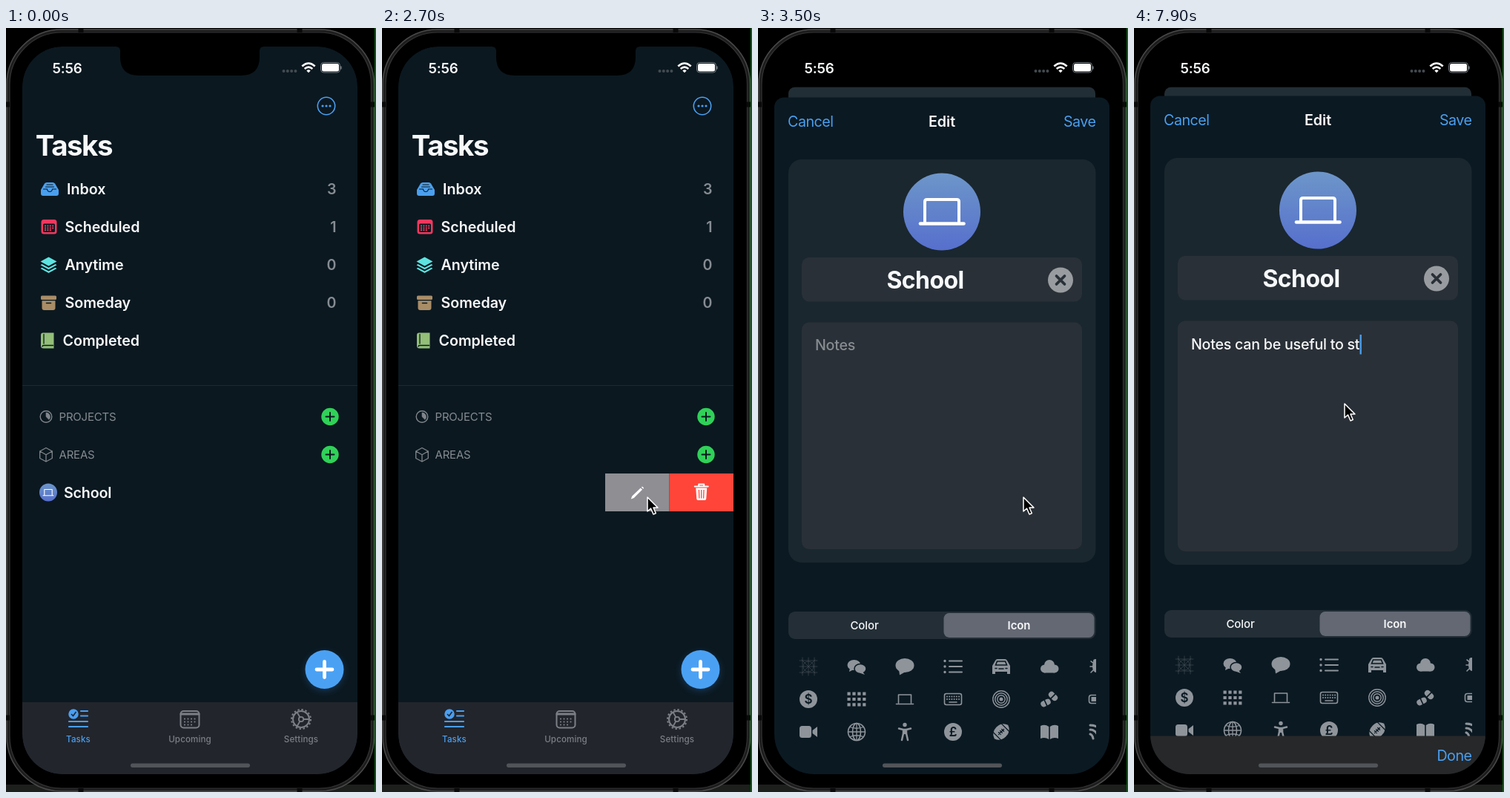
An HTML page for the animation above (8000 ms loop, 499x1029 px).

```html
<!DOCTYPE html>
<html lang="en">
<head>
<meta charset="utf-8">
<title>Task list</title>
<style>
html, body { margin: 0; width: 100%; height: 100%; overflow: hidden; background: #000; }
svg { display: block; width: 100%; height: 100%; }
text { font: 600 19.7px Inter, Roboto, sans-serif; font-optical-sizing: none; letter-spacing: -.05px; fill: #f6f8f9; white-space: pre; }
.link { font-weight: 400; letter-spacing: -.5px; fill: #4a9ff0; }
.end { text-anchor: end; }
.mid { text-anchor: middle; }
.count { fill: #868c92; text-anchor: end; }
.section { font-size: 15px; font-weight: 400; letter-spacing: -.2px; fill: #858b90; }
.tab { font-size: 11.6px; font-weight: 500; letter-spacing: .1px; fill: #7c7f85; text-anchor: middle; }
.seg { font-size: 15px; font-weight: 500; letter-spacing: -.1px; text-anchor: middle; }
.note { font-weight: 500; letter-spacing: -.27px; }
.o { fill: none; stroke: #8e949a; stroke-width: 1.6; stroke-linecap: round; stroke-linejoin: round; }
.cut { fill: none; stroke: #0b1820; stroke-width: 1.6; stroke-linecap: round; }
.w { fill: none; stroke: #fff; stroke-linecap: round; stroke-linejoin: round; }
#icons { fill: #8e949a; }
#icons text { font-size: 17px; font-weight: 600; fill: #0b1922; text-anchor: middle; }
#icons .cut { stroke: #0b1922; }
</style>
</head>
<body>
<svg viewBox="0 0 499 1029" preserveAspectRatio="none">
<defs>
  <linearGradient id="blue" x2="0" y2="1"><stop stop-color="#6d96c9"/><stop offset="1" stop-color="#566fcd"/></linearGradient>
  <clipPath id="screen"><rect x="22" y="25" width="452" height="980" rx="54"/></clipPath>
  <clipPath id="homeClip"><rect id="homeShape" x="22" y="25" width="452" height="980" rx="54"/></clipPath>
  <clipPath id="iconClip"><rect x="41" y="830" width="415" height="180"/></clipPath>
  <filter id="glow" x="-50%" y="-50%" width="200%" height="200%"><feGaussianBlur stdDeviation="5"/></filter>
</defs>

<!-- phone body -->
<rect width="499" height="1029"/>
<rect y="1019" width="499" height="10" fill="#1c1f1c"/>
<rect x="1" y="2" width="495.5" height="1026" rx="74" fill="#1d1d1e" stroke="#4b4b4c" stroke-width="1.5"/>
<rect x="5" y="6" width="487.5" height="1018" rx="70" stroke="#333334" stroke-width="1.2"/>
<path d="M0 103H5M492 103H497M0 929H5M492 929H497M101 1V6M396 1V6M101 1024V1029M396 1024V1029" stroke="#0a0a0a" stroke-width="7"/>
<path d="M498 0V1029" stroke="#06600c" stroke-width="2"/>

<g clip-path="url(#screen)">
  <g id="home"><g clip-path="url(#homeClip)">
    <rect id="homeBg" x="22" y="25" width="452" height="980"/>
    <g id="menu" fill="#4a9ff0" stroke="#4a9ff0">
      <circle cx="432" cy="105" r="11.7" fill="none" stroke-width="1.6"/>
      <path d="M427 105h.01M432 105h.01M437 105h.01" stroke-width="3.2" stroke-linecap="round"/>
    </g>
    <text x="39.8" y="172.3" style="font-size:38.5px;font-weight:700;letter-spacing:-1.5px">Tasks</text>
    <g id="lists"></g>

    <path d="M47 218L52 209.5Q53 208 55 208H63Q65 208 66 209.5L71 218V223Q71 226 68 226H50Q47 226 47 223Z" fill="#4a9fee"/>
    <path class="cut" d="M50.5 217H55.5Q56 220.5 59 220.5Q62 220.5 62.5 217H67.5M55 211H63M53.5 214H64.5" style="stroke-width:1.1"/>

    <rect x="47.5" y="258" width="21" height="19.5" rx="3.5" fill="#f0385f"/>
    <rect x="50" y="263.5" width="16" height="11.5" rx="1.5" fill="#0b1820"/>
    <path d="M52 266.5H65M52 269.4H65M52 272.3H62" stroke="#f0385f" stroke-width="2" stroke-dasharray="2 1.4"/>

    <g fill="#5fe3e0"><path d="M57.5 308.5L68.5 314.5L57.5 320.5L46.5 314.5Z"/>
      <path d="M48.5 318L57.5 322.8L66.5 318L68.5 319.2L57.5 325.2L46.5 319.2Z"/>
      <path d="M48.5 322.8L57.5 327.6L66.5 322.8L68.5 324L57.5 330L46.5 324Z"/></g>

    <g fill="#a98d67"><rect x="47" y="360.5" width="21" height="5.5" rx="1.5"/>
      <path d="M48.5 367.3H66.5V377Q66.5 380 63.5 380H51.5Q48.5 380 48.5 377Z"/></g>
    <path class="cut" d="M54.5 370.5H60.5"/>

    <path d="M50 410.5H64.5V431.5H50.5Q47 431.5 47 428V413.5Q47 410.5 50 410.5Z" fill="#93bf78"/>
    <path class="cut" d="M51 412.5V425M63.5 427.5H51Q49 427.5 49 429" style="stroke-width:1.3"/>

    <path d="M22 481.5H474" stroke="#1c2931"/>
    <circle cx="54" cy="523.5" r="7.8" class="o" style="stroke:#80868b;stroke-width:1.4"/>
    <path d="M54 518V523.5L58 527.4A5.6 5.6 0 0 0 54 518Z" fill="#80868b" stroke="#80868b" stroke-width=".6"/>
    <path d="M54 565.5L62.3 570V579.5L54 584L45.7 579.5V570ZM45.7 570L54 574.7L62.3 570M54 574.7V584" class="o" style="stroke:#80868b;stroke-width:1.3"/>
    <text x="71.5" y="529" class="section">PROJECTS</text>
    <text x="71.5" y="580" class="section">AREAS</text>
    <g id="adds"></g>

    <g id="row">
      <circle cx="57" cy="625.5" r="12" fill="url(#blue)"/>
      <path class="w" d="M51.8 629V621.5H62.2V629M50 629.7H64" stroke-width="1.1"/>
      <text x="78" y="632.7" style="letter-spacing:-.2px">School</text>
    </g>
    <rect id="editBtn" y="600" height="51" fill="#8e8e93"/>
    <rect id="trashBtn" y="600" height="51" fill="#ff453a"/>
    <path id="pencil" d="M-8.5 8.5L-7 4.5L4.5 -6.5L6.8 -4.2L-4.5 7ZM5.6 -7.6L6.8 -8.6L8.9 -6.5L7.9 -5.3Z" fill="#fff"/>
    <g id="trash"><path class="w" d="M-9 -7.5H9M-3.5 -8V-10.5H3.5V-8" stroke-width="2"/>
      <path d="M-7.5 -5.5H7.5L6.5 9Q6.4 11 4.5 11H-4.5Q-6.4 11 -6.5 9Z" fill="#fff"/>
      <path d="M-3.3 -3L-2.9 8.5M0 -3V8.5M3.3 -3L2.9 8.5" stroke="#ff453a" stroke-width="1.3"/></g>

    <circle cx="429.5" cy="867" r="26" fill="#2f6ca8" opacity=".35" filter="url(#glow)"/>
    <circle cx="429.5" cy="864" r="26" fill="#4aa1f4"/>
    <path class="w" d="M419 864H440M429.5 853.5V874.5" stroke-width="4.8"/>

    <rect x="22" y="908" width="452" height="97" fill="#22252c"/>
    <g stroke="#4a9ff0" stroke-width="2.2" stroke-linecap="round"><circle cx="91" cy="924" r="6" fill="#4a9ff0" stroke-width="1.5"/>
      <path d="M101 920H110M101 926.5H110M85 934H110M85 941H110"/></g>
    <path d="M88 924L90.5 926.5L94.5 921" fill="none" stroke="#22252c" stroke-width="1.6"/>
    <g class="o" style="stroke:#7c7f85;stroke-width:2"><rect x="235.5" y="920" width="25" height="22.5" rx="4"/><path d="M236 924H260" stroke-width="3"/>
      <path d="M241 930.5H257M241 934.5H257M241 938.5H253" stroke-dasharray=".01 4.5" stroke-width="2.2"/></g>
    <g fill="none" stroke="#7c7f85" stroke-width="2"><circle cx="398" cy="931" r="11"/>
      <circle cx="398" cy="931" r="13" stroke-dasharray="2.4 2.705"/>
      <circle cx="398" cy="931" r="3.2" stroke-width="1.8"/><path d="M401.2 931H409M396.4 928.2L392.5 921.5M396.4 933.8L392.5 940.5" stroke-width="1.8"/></g>
    <text x="97.5" y="961.5" class="tab" style="fill:#4a9ff0">Tasks</text>
    <text x="248" y="961.5" class="tab">Upcoming</text>
    <text x="398" y="961.5" class="tab">Settings</text>
    <rect id="dim" x="22" y="25" width="452" height="980"/>
  </g></g>

  <g id="sheet">
    <rect x="22" y="91.5" width="452" height="1000" rx="13" fill="#0b1922"/>
    <text x="40" y="131" class="link">Cancel</text>
    <text x="248" y="131" class="mid">Edit</text>
    <text x="455.5" y="131" class="link end">Save</text>
    <rect id="card" x="41" y="175" width="414.5" rx="18" fill="#1a272e"/>
    <circle cx="248" cy="245.5" r="52" fill="url(#blue)"/>
    <path class="w" d="M225 259V232Q225 229 228 229H268Q271 229 271 232V259" stroke-width="4"/>
    <path class="w" d="M219 261.5H277.5" stroke-width="4.6"/>
    <rect x="59" y="307" width="378" height="59.5" rx="10" fill="#293037"/>
    <text x="225.5" y="349" class="mid" style="font-size:32px;font-weight:700;letter-spacing:-.6px">School</text>
    <circle cx="408" cy="337.5" r="17" fill="#989ca0"/>
    <path d="M402.5 332L413.5 343M413.5 332L402.5 343" stroke="#293037" stroke-width="3.8" stroke-linecap="round"/>
    <rect id="notesBox" x="59" y="394.5" width="378" rx="10" fill="#2a3037"/>
    <text id="note" x="77" y="432.5" class="note"></text>
    <rect id="caret" y="413" width="2.3" height="26.5" fill="#4a9ff0"/>
    <rect x="41" y="784" width="414.5" height="37" rx="9" fill="#232e36"/>
    <rect x="250.5" y="786" width="203" height="33" rx="7.5" fill="#636873"/>
    <text x="143.5" y="808" class="seg">Color</text>
    <text x="352" y="808" class="seg" style="font-weight:600">Icon</text>
    <g id="icons" clip-path="url(#iconClip)"></g>
  </g>

  <g id="toolbar">
    <rect x="22" y="953.5" width="452" height="60" fill="#272829"/>
    <text x="455.5" y="987" class="link end">Done</text>
  </g>
  <rect x="168" y="990.5" width="161" height="5.5" rx="2.75" fill="#515459"/>
  <path d="M148 24V25Q154 25 154 31V39Q154 64 179 64H317Q342 64 342 39V31Q342 25 348 25V24Z"/>
  <text x="82.5" y="60.5" class="mid" style="font-size:18.8px;letter-spacing:-.2px">5:56</text>
  <path d="M374.5 58H392" stroke="#434b51" stroke-width="4" stroke-linecap="round" stroke-dasharray=".01 5.3"/>
  <g class="w" stroke-width="2.6" style="stroke-linecap:butt"><path d="M399.3 51.5Q408 43.5 416.7 51.5M402.7 55Q408 50.2 413.3 55"/><path d="M405.3 57.5Q408 55.2 410.7 57.5L408 60.2Z" fill="#fff" stroke="none"/></g>
  <rect x="424.5" y="46.5" width="26" height="13.5" rx="4" fill="none" stroke="#747b80"/>
  <rect x="426" y="48" width="23" height="10.5" rx="2.5" fill="#fff"/>
  <path d="M452 51.5V55.5" stroke="#747b80" stroke-width="1.5"/>
</g>
<path id="cursor" d="M0 0V19L4.5 15L8 23L11.3 21.5L8 14H14Z" stroke="#fff" stroke-width="1.5" stroke-linejoin="round"/>
</svg>

<script>
const $ = id => document.getElementById(id);
const set = (id, attrs) => { for (const k in attrs) $(id).setAttribute(k, attrs[k]); };
const clamp = v => Math.min(1, Math.max(0, v));
const lerp = (a, b, k) => a + (b - a) * k;
const smooth = k => k * k * (3 - 2 * k);
const span = (t, a, b) => clamp((t - a) / (b - a));

// remaining distance of a critically damped spring, 1 → 0
const spring = (t, start) => {
  const x = Math.max(0, t - start) * 0.018;
  return (1 + x) * Math.exp(-x);
};

const lists = [['Inbox', 82, 3], ['Scheduled', 79.5, 1], ['Anytime', 79.5, 0], ['Someday', 79.5, 0], ['Completed', 76.5, '']];
$('lists').innerHTML = lists.map(([name, x, n], i) => {
  const y = 224 + i * 51.1;
  return `<text x="${x}" y="${y}">${name}</text><text x="445.5" y="${y}" class="count">${n}</text>`;
}).join('');

$('adds').innerHTML = [523.5, 574.5].map(y =>
  `<circle cx="437" cy="${y}" r="11.7" fill="#30d158"/>
   <path class="cut" d="M431.5 ${y}h11M437 ${y - 5.5}v11" style="stroke-width:2"/>`).join('');

const coin = sign => `<circle r="12"/><text y="6">${sign}</text>`;
const dots = (rows, style) => `<path class="o" d="${rows.map(y => `M-12.5 ${y}H12.5`).join('')}" style="${style}"/>`;
const glyphs = [
  `<g opacity=".4"><path class="o" d="M-12 -8H12M-12 0H12M-12 8H12M-8 -12V12M0 -12V12M8 -12V12M-9 -9L9 9M9 -9L-9 9" style="stroke-width:.7"/><circle class="o" r="7" style="stroke-width:.7"/></g>`,
  `<ellipse cx="-3.5" cy="-2" rx="9" ry="7"/><path d="M-9 2L-10 7L-4 4Z"/><ellipse cx="5" cy="3" rx="8" ry="6.5" stroke="#0b1922" stroke-width="1.5"/><path d="M8 7L11 11L4 8.5Z"/>`,
  `<ellipse cy="-1.5" rx="12.5" ry="9.5"/><path d="M-8 4L-7 11.5L1 7Z"/>`,
  `<path class="o" d="M-5 -7.5H12M-5 0H12M-5 7.5H12" style="stroke-width:2"/><path class="o" d="M-11 -7.5h.01M-11 0h.01M-11 7.5h.01" style="stroke-width:3.4"/>`,
  `<path d="M-12 -1L-8 -8Q-7 -10 -5 -10H5Q7 -10 8 -8L12 -1V10H8V7H-8V10H-12Z"/><path class="cut" d="M-7.5 -2L-5.5 -7H5.5L7.5 -2Z"/><path class="cut" d="M-8 2.5h2M6 2.5h2M-3 3H3"/>`,
  `<circle cx="-6.5" cy="3" r="5.5"/><circle cx="0" cy="-2" r="7"/><circle cx="7" cy="3" r="5.5"/><rect x="-7" y="0" width="14" height="8.5"/>`,
  `<ellipse cx="-2" rx="5" ry="8"/><circle cx="-3" cy="-7" r="3"/><path class="o" d="M-5 -4L-9 -7M-5 0H-10M-5 4L-9 8"/>`,
  coin('$'),
  dots([-7.4, 0, 7.4], 'stroke-linecap:butt;stroke-width:4.2;stroke-dasharray:4.2 2.7'),
  `<path class="o" d="M-8.5 5V-6H8.5V5M-11.5 6.5H11.5"/>`,
  `<rect class="o" x="-11.5" y="-7.5" width="23" height="15" rx="2.5"/><path class="o" d="M-8 -3.5H8.5M-8 0H8.5" style="stroke-width:2;stroke-dasharray:.01 3.2"/><path class="o" d="M-5 4H5"/>`,
  [11.2, 8.2, 5.2].map(r => `<circle class="o" r="${r}" style="stroke-width:1.4"/>`).join('') + '<circle r="2.5"/>',
  `<g transform="translate(-5 5) rotate(-25)"><rect x="-7" y="-4" width="14" height="8" rx="4"/><path class="cut" d="M0 -4V4"/></g><g transform="translate(5 -4) rotate(45)"><rect x="-7" y="-4" width="14" height="8" rx="4"/><path class="cut" d="M0 -4V4"/></g>`,
  `<rect class="o" x="-11.5" y="-5.5" width="22" height="11" rx="3"/><rect x="-8.5" y="-3" width="14" height="6"/>`,
  `<rect x="-12" y="-8" width="16" height="16" rx="3.5"/><path d="M5.5 -2L12 -7V7L5.5 2Z"/>`,
  `<circle class="o" r="11.5"/><ellipse class="o" rx="5.5" ry="11.5"/><path class="o" d="M0 -11V11M-11 0H11M-9 -6.5Q0 -3 9 -6.5M-9 6.5Q0 3 9 6.5" style="stroke-width:1.3"/>`,
  `<circle cy="-9.5" r="2.7"/><path class="o" d="M-8 -4.5L-2 -3V2L-4 11M8 -4.5L2 -3V2L4 11M-2 -3H2M0 -3V2" style="stroke-width:2.5"/>`,
  coin('£'),
  `<g transform="rotate(-45)"><path d="M-13 0Q-10 -9 0 -9Q10 -9 13 0Q10 9 0 9Q-10 9 -13 0Z"/><path class="cut" d="M-5 0H5M-3 -2V2M0 -2V2M3 -2V2M-8 -7V7M8 -7V7" style="stroke-width:1.3"/></g>`,
  `<path d="M-.8 -7Q-6 -11 -12 -8V9Q-6 6.5 -.8 10ZM.8 -7Q6 -11 12 -8V9Q6 6.5 .8 10Z"/>`,
  `<path class="o" d="M-10 -9Q0 -9 6 -1M-10 -3Q-4 -3 0 4M-10 3Q-7 4 -6 9" style="stroke-width:3"/>`
];
$('icons').innerHTML = glyphs.map((g, i) =>
  `<g transform="translate(${68 + i % 7 * 65} ${858 + Math.floor(i / 7) * 44})">${g}</g>`).join('');

// typing: tenths of a second at which each letter lands
const phrase = 'Notes can be useful to st';
const keys = [45, 47, 48, 49, 51, 53, 54, 56, 57, 58, 59, 61, 62, 64, 64, 66, 68, 69, 71, 72, 74, 75, 76, 77, 79];

// time, x, y of the pointer tip
const path = [[0, 500, 1030], [900, 330, 632], [1100, 330, 632], [1700, 78, 626], [2100, 78, 626],
  [2700, 358, 632], [3800, 358, 632], [4100, 284, 506], [8000, 284, 506]];

function pointer(t) {
  const i = path.findIndex((p, n) => n && t <= p[0]);
  const [a, b] = [path[i - 1], path[i]];
  const k = smooth(span(t, a[0], b[0]));
  return [lerp(a[1], b[1], k), lerp(a[2], b[2], k)];
}

function drawSwipe(t, tipX) {
  const pull = clamp((330 - tipX) / 200);
  const open = t < 2100 ? 173 * pull : 173 * spring(t, 2937);
  const half = open / 2;
  set('row', { transform: `translate(${-open} 0)` });
  set('editBtn', { x: 474 - open, width: half });
  set('trashBtn', { x: 474 - half, width: half });
  const opacity = clamp((half - 24) / 24);
  set('pencil', { transform: `translate(${474 - half * 1.5} 626)`, opacity });
  set('trash', { transform: `translate(${474 - half / 2} 625)`, opacity });
}

function drawSheet(t) {
  const left = spring(t, 3035), p = 1 - left;
  set('home', { transform: `translate(248 ${25 + 54.5 * p}) scale(${1 - 0.084 * p}) translate(-248 -25)` });
  set('homeShape', { rx: 10 + 44 * left ** 3 });
  set('homeBg', { fill: `rgb(${lerp(11, 40, p)},${lerp(24, 53, p)},${lerp(32, 62, p)})` });
  set('dim', { opacity: 0.14 * p + 0.1 * Math.min(p, left) });
  const tint = p > 0 ? '#596268' : '#4a9ff0';
  set('menu', { fill: tint, stroke: tint });
  set('sheet', { transform: `translate(0 ${914 * left})` });
}

function drawNote(t) {
  const count = keys.filter(k => k * 100 <= t).length;
  const note = $('note');
  note.textContent = count ? phrase.slice(0, count) : 'Notes';
  note.style.fill = count ? '#f6f8f9' : '#878c91';
  const width = count ? note.getComputedTextLength() : 0;
  set('caret', { x: 77.3 + width, opacity: t >= 4200 ? 1 : 0 });
  const rise = 1 - (1 - span(t, 4100, 4500)) ** 3;
  set('toolbar', { transform: `translate(0 ${53 * (1 - rise)})` });
  set('card', { height: 543 + 5 * rise });
  set('notesBox', { height: 305.5 + 5 * rise });
}

function render(now) {
  const t = Math.floor(now % 8000 / 100) * 100;
  const [x, y] = pointer(t);
  set('cursor', { transform: `translate(${x} ${y})`, opacity: t ? 1 : 0 });
  drawSwipe(t, x);
  drawSheet(t);
  drawNote(t);
}

const start = performance.now();
const loop = () => { render(performance.now() - start); requestAnimationFrame(loop); };
loop();
</script>
</body>
</html>
```
